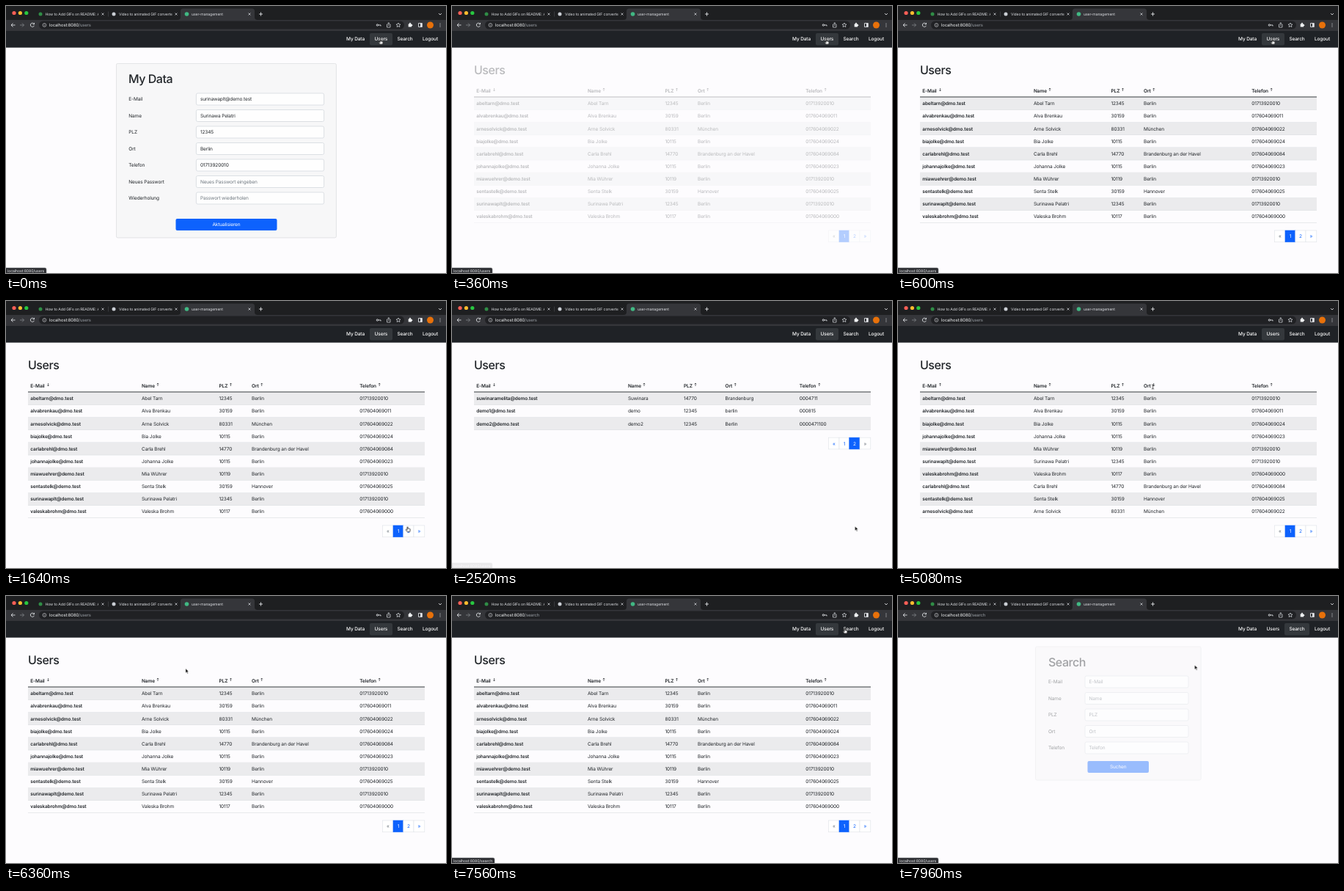
Write an HTML page that moves like this. It is 600 by 364 pixels and loops after 8 s.

```html
<!DOCTYPE html>
<html lang="de">
<head>
<meta charset="utf-8">
<title>user-management</title>
<style>
html, body { margin: 0; width: 100%; height: 100%; overflow: hidden; background: #fdfcfe; }
svg { display: block; width: 600px; height: 364px; }
text { font-family: Inter, "Open Sans", sans-serif; letter-spacing: -.018em; text-rendering: geometricPrecision; white-space: pre; }
.icon { fill: none; stroke: #dfe1e5; stroke-width: .9; }
</style>
</head>
<body>
<script>
const LOOP = 8000;
const INK = '#212529', BLUE = '#0d62fd', GRAY = '#6c757d';
let css = '';

const rect = (x, y, w, h, fill, r = 0, more = '') =>
  `<rect x="${x}" y="${y}" width="${w}" height="${h}" rx="${r}" fill="${fill}" ${more}/>`;
const dot = (x, y, r, fill) => `<circle cx="${x}" cy="${y}" r="${r}" fill="${fill}"/>`;
const icon = (d, more = '') => `<path class="icon" d="${d}" ${more}/>`;
// Text is placed by its vertical centre.
const text = (x, cy, s, { size = 6.5, fill = INK, weight = 400, more = '' } = {}) =>
  `<text x="${x}" y="${cy + size * .36}" font-size="${size}" font-weight="${weight}" fill="${fill}" ${more}>${s}</text>`;
const centered = (x, cy, s, opts = {}) => text(x, cy, s, { ...opts, more: 'text-anchor="middle"' });
const title = (x, cy, s) => text(x, cy, s, { size: 16, weight: 500, more: 'style="letter-spacing:-.03em"' });
const group = (id, body) => `<g id="${id}">${body}</g>`;

function animate(id, frames, easing) {
  const rules = frames.map(([t, rule]) => `${t / LOOP * 100}%{${rule}}`).join('');
  css += `@keyframes ${id}{${rules}}#${id}{animation:${id} ${LOOP}ms ${easing} infinite}`;
}
const fade = (id, frames, easing = 'ease') =>
  animate(id, frames.map(([t, o]) => [t, `opacity:${o}`]), easing);
function show(id, ...spans) {
  const at = new Map([[0, 0]]);
  for (const [from, to] of spans) { at.set(from, 1); at.set(to, 0); }
  if (at.get(LOOP) === undefined) at.set(LOOP, 0);
  fade(id, [...at].sort((a, b) => a[0] - b[0]), 'step-end');
}

function browser() {
  const tabText = { size: 5.1, fill: '#dfe1e5' };
  const close = x => icon(`M${x - 1.5} 9.5l3 3m0-3l-3 3`, 'style="stroke-width:.7"');
  const clipped = (x, s) => `<svg x="${x}" y="0" width="72.5" height="19">${text(0, 11, s, tabText)}</svg>`;
  return rect(0, 0, 600, 19, '#1e1f21')
    + ['#ff5f57', '#febc2e', '#28c840'].map((c, i) => dot(11 + i * 8.4, 9.5, 2.6, c)).join('')
    + '<path d="M234 19q4 0 4-4V7q0-3.5 3.5-3.5h94q3.5 0 3.5 3.5v8q0 4 4 4z" fill="#35363a"/>'
    + dot(47, 11, 2.5, '#2f8d46') + clipped(53.5, 'How to Add GIFs on README: A guide')
    + dot(147, 11, 2.5, '#c9cdd3') + clipped(154, 'Video to animated GIF converter')
    + dot(246.5, 11, 2.8, '#41b883') + text(253, 11, 'user-management', tabText)
    + [132, 232, 332].map(close).join('') + rect(139, 7.5, .6, 7, '#4a4c50')
    + icon('M345 11h5m-2.5-2.5v5') + icon('M590 10l2 2 2-2')
    + rect(0, 19, 600, 15, '#35363a')
    + icon('M12.5 26h-5.5m2.5-2.5l-2.5 2.5 2.5 2.5')
    + icon('M19 26h5.5m-2.5-2.5l2.5 2.5-2.5 2.5', 'style="stroke:#7b7e83"')
    + icon('M38.2 24.5a2.6 2.6 0 1 0 .2 2.3M38.5 22.9v2h-2')
    + rect(45, 20.5, 498, 11, '#202124', 5.5)
    + icon('M50 26a2.4 2.4 0 1 0 4.8 0a2.4 2.4 0 1 0-4.8 0M52.4 25.7v1.6M52.4 24.4v.6', 'style="stroke-width:.6"')
    + text(59, 26, 'localhost:8080', { size: 5.9, fill: '#f1f3f4' })
    + group('pathUsers', text(98.9, 26, '/users', { size: 5.9, fill: '#9aa0a6' }))
    + group('pathSearch', text(98.9, 26, '/search', { size: 5.9, fill: '#9aa0a6' }))
    + icon('M505.2 26a1.2 1.2 0 1 0 2.4 0a1.2 1.2 0 1 0-2.4 0M507.6 26h3.4v1.5')
    + icon('M520.5 25h-1v4h4.5v-4h-1M521.8 27v-4.3m-1.3 1.3l1.3-1.3 1.3 1.3', 'style="stroke-width:.7"')
    + icon('M535 23l.9 1.9 2.1.2-1.6 1.4.5 2.1-1.9-1.1-1.9 1.1.5-2.1-1.6-1.4 2.1-.2z', 'style="stroke-width:.7"')
    + rect(548.7, 24.2, 4.4, 4.4, '#f1f3f4', .6) + dot(551, 23.8, 1, '#f1f3f4') + dot(553.4, 26.3, 1, '#f1f3f4')
    + icon('M562.5 23.5h4.8v5h-4.8z') + rect(565, 23.5, 2.4, 5, '#dfe1e5')
    + dot(578.5, 26, 4.5, '#e8710a')
    + [24, 26, 28].map(y => dot(592, y, .6, '#dfe1e5')).join('');
}

function navbar() {
  const link = (x, s) => centered(x, 45, s, { weight: 500, fill: '#fff' });
  return rect(0, 34, 600, 22.7, '#1f2226')
    + group('navUsers', rect(496, 37, 31, 16.5, '#34383c', 2))
    + group('navSearch', rect(527, 37, 34, 16.5, '#34383c', 2))
    + link(476.6, 'My Data') + link(511.4, 'Users') + link(544, 'Search') + link(578.5, 'Logout');
}

const card = (x, y, w, h) => rect(x, y, w, h, '#f7f7f8', 2, 'stroke="#dcdde0" stroke-width=".8"');
const fields = (labelX, x, w, cy, rows) => rows.map(([label, value, hint], i) => {
  const y = cy + i * 22.5;
  return text(labelX, y, label) + rect(x, y - 8, w, 16, '#fff', 2, 'stroke="#ced4da" stroke-width=".7"')
    + text(x + 5.5, y, value, { fill: hint ? GRAY : INK });
}).join('');
const button = (x, y, w, s) => rect(x, y, w, 16, BLUE, 2) + centered(x + w / 2, y + 8, s, { fill: '#fff' });

const profile = () => card(150.4, 78.4, 300, 237.5) + title(167, 99.3, 'My Data')
  + fields(167.3, 259.4, 174.2, 127, [
    ['E-Mail', 'surinawaplt@demo.test'], ['Name', 'Surinawa Pelatri'], ['PLZ', '12345'],
    ['Ort', 'Berlin'], ['Telefon', '01713920010'],
    ['Neues Passwort', 'Neues Passwort eingeben', 1], ['Wiederholung', 'Passwort wiederholen', 1]])
  + button(231.5, 290, 138, 'Aktualisieren');

const search = () => card(187.6, 69, 225.6, 182) + title(205, 89.8, 'Search')
  + fields(205, 255, 141, 117, ['E-Mail', 'Name', 'PLZ', 'Ort', 'Telefon'].map(s => [s, s, 1]))
  + button(258.5, 225, 83.5, 'Suchen');

const HEADERS = [['E-Mail', 24.2], ['Name', 22], ['PLZ', 16], ['Ort', 13.7], ['Telefon', 27]];

function table(columns, rows, sorted, page) {
  const bold = { weight: 600 };
  const arrow = (x, down) =>
    `<path d="M0 2V-2M-1.2 -.7L0 -2 1.2 -.7" transform="translate(${x} 114)${down ? ' scale(1 -1)' : ''}" fill="none" stroke="${INK}" stroke-width=".65"/>`;
  const head = HEADERS.map(([name, offset], i) =>
    text(columns[i], 115.2, name, bold) + arrow(columns[i] + offset, i === sorted)).join('');
  const body = rows.map((row, i) => {
    const y = 124.4 + i * 17.12;
    return rect(30, y, 541, 17.12, i % 2 ? 'none' : '#ebebed') + rect(30, y + 16.8, 541, .6, '#d9dcdf')
      + row.map((s, c) => text(columns[c], y + 8.6, s, c ? {} : bold)).join('');
  }).join('');
  const top = 124.4 + rows.length * 17.12 + 10.4;
  const pager = [['«', 513.6, 14.4], ['1', 528, 13.8], ['2', 541.8, 14.2], ['»', 556, 14.8]].map(([s, x, w], i) => {
    const active = i === page, off = i === (page === 1 ? 0 : 3);
    return rect(x, top, w, 15.8, active ? BLUE : '#fff', 0, `stroke="${active ? BLUE : '#dee2e6'}" stroke-width=".6"`)
      + centered(x + w / 2, top + 8, s, { fill: active ? '#fff' : off ? GRAY : BLUE });
  }).join('');
  return head + body + rect(30, 123.5, 541, 1, '#33373b') + pager;
}

const PEOPLE = [
  ['abeltarn@dmo.test', 'Abel Tarn', '12345', 'Berlin', '01713920010'],
  ['alvabrenkau@dmo.test', 'Alva Brenkau', '30159', 'Berlin', '017604069011'],
  ['arnesolvick@dmo.test', 'Arne Solvick', '80331', 'München', '017604069022'],
  ['biajolke@dmo.test', 'Bia Jolke', '10115', 'Berlin', '017604069024'],
  ['carlabrehl@dmo.test', 'Carla Brehl', '14770', 'Brandenburg an der Havel', '017604069084'],
  ['johannajolke@dmo.test', 'Johanna Jolke', '10115', 'Berlin', '017604069023'],
  ['miawuehrer@demo.test', 'Mia Wührer', '10119', 'Berlin', '01713920010'],
  ['sentastelk@demo.test', 'Senta Stelk', '30159', 'Hannover', '017604069025'],
  ['surinawaplt@demo.test', 'Surinawa Pelatri', '12345', 'Berlin', '01713920010'],
  ['valeskabrohm@dmo.test', 'Valeska Brohm', '10117', 'Berlin', '017604069000']];
const MORE_PEOPLE = [
  ['suwinaramelita@demo.test', 'Suwinara', '14770', 'Brandenburg', '0004711'],
  ['demo1@dmo.test', 'demo', '12345', 'berlin', '000815'],
  ['demo2@demo.test', 'demo2', '12345', 'Berlin', '0000471100']];
const byCity = [...PEOPLE].sort((a, b) => a[3] < b[3] ? -1 : a[3] > b[3] ? 1 : 0);
const WIDE = [33.3, 185, 290.5, 335, 482.2], NARROW = [33.3, 240, 316, 372.6, 473.8];

const users = () => title(30, 87.5, 'Users')
  + group('byMail', table(WIDE, PEOPLE, 0, 1))
  + group('byOrt', table(WIDE, byCity, 3, 1))
  + group('pageTwo', table(NARROW, MORE_PEOPLE, 0, 2));

const status = (path, w) => rect(-2, 357, w + 2, 10, '#2f3034', 2, 'stroke="#6b6d71" stroke-width=".5"')
  + text(2, 361, 'localhost:8080/' + path, { size: 5.2, fill: '#e3e5e8' });

// Pointer shapes have their hot spot at 0,0.
const pointer = () =>
  group('arrow', '<path d="M0 0V6.2L1.5 4.9 2.5 7.2 3.5 6.8 2.5 4.5H4.4Z" fill="#000" stroke="#fff" stroke-width=".6"/>')
  + group('hand', '<path d="M-.6 .5Q0-.3 .6 .5V2.4L3 2.8Q3.8 3 3.7 4L3.1 6.8H-.5L-2.4 4.3Q-2.4 3.3-1.5 3.7L-.6 4.4Z" fill="#fff" stroke="#000" stroke-width=".7"/>')
  + group('beam', '<path d="M-1.4-3Q0-3 0-2.2Q0-3 1.4-3M0-2.2V2.2M-1.4 3Q0 3 0 2.2Q0 3 1.4 3" fill="none" stroke="#111" stroke-width=".8"/>');

document.body.innerHTML = '<svg viewBox="0 0 600 364">' + rect(0, 0, 600, 364, '#fdfcfe')
  + group('profile', profile()) + group('users', users()) + group('search', search())
  + browser() + navbar()
  + group('statusUsers', status('users', 55)) + group('statusSearch', status('search', 58))
  + group('pointer', pointer()) + '</svg>';

fade('profile', [[0, 1], [300, 0], [LOOP, 0]]);
fade('users', [[0, 0], [300, 0], [600, 1], [7585, 1], [7885, 0], [LOOP, 0]]);
fade('search', [[0, 0], [7885, 0], [7960, .41], [LOOP, .6]], 'linear');

show('byMail', [0, 2160], [3040, 4680], [5680, LOOP]);
show('byOrt', [4680, 5680]);
show('pageTwo', [2160, 3040]);
show('navUsers', [0, 7600]);
show('navSearch', [7600, LOOP]);
show('pathUsers', [0, 7530]);
show('pathSearch', [7530, LOOP]);

fade('statusUsers', [[0, 1], [1200, 1], [1400, 0], [1680, 0], [1760, 1], [2320, 1], [2540, 0], [2900, 0],
  [2980, 1], [3180, 1], [3400, 0], [7760, 0], [7761, 1], [LOOP, 1]], 'linear');
fade('statusSearch', [[0, 0], [7380, 0], [7460, 1], [7760, 1], [7761, 0], [LOOP, 0]], 'linear');

show('hand', [0, 1040], [1200, 1500], [1620, 2160], [2880, 4130], [7240, 7690]);
show('beam', [4320, 5760]);
show('arrow', [1040, 1200], [1500, 1620], [2160, 2880], [4130, 4320], [5760, 7240], [7690, LOOP]);

animate('pointer', [
  [0, 510.5, 45.5], [960, 510.5, 45.5], [1700, 548, 311], [2200, 548, 311], [2480, 549.5, 307],
  [2640, 549.5, 307], [2980, 534, 192], [3200, 534, 192], [4000, 263.5, 127], [4240, 300, 122],
  [4560, 347.5, 117], [5160, 347.5, 117], [5560, 52, 115], [5700, 52, 115], [5960, 95, 113],
  [6800, 420, 82], [7360, 535.5, 44.3], [7640, 535.5, 44.3], [7760, 511, 47], [7960, 404.5, 94], [LOOP, 400, 97],
].map(([t, x, y]) => [t, `transform:translate(${x}px,${y}px)`]), 'ease-in-out');

document.head.insertAdjacentHTML('beforeend', `<style>${css}</style>`);
</script>
</body>
</html>
```
